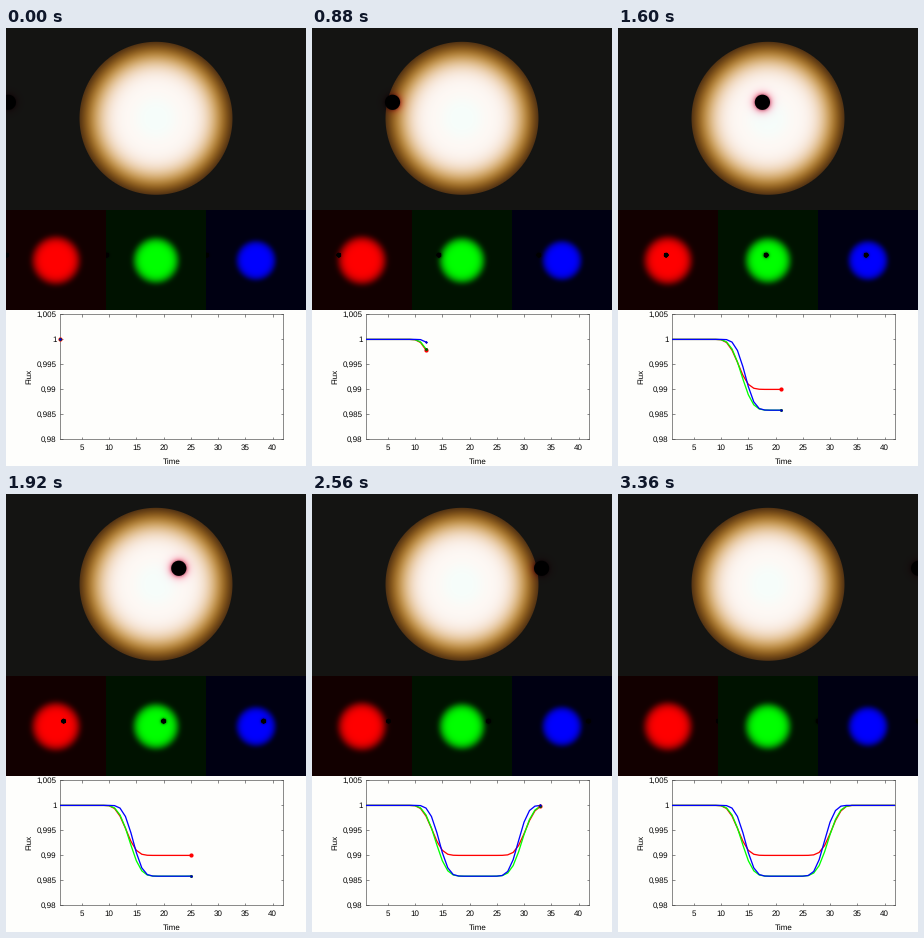
Write a matplotlib script that moves like this. It is 300 px wide and 438 px high and loops after 3440 ms.

```python
import numpy as np
import matplotlib.pyplot as plt
from matplotlib.animation import FuncAnimation

W, H, FRAMES, STEP_MS = 300, 438, 43, 80
SPLIT, PANEL = 182, 100
PAPER = (254, 254, 252)
SKY = np.array([20, 20, 18])

plt.rcParams.update({"font.family": "Liberation Sans", "font.size": 7.8,
                     "text.hinting": "none", "text.hinting_factor": 1})
fig = plt.figure(figsize=(W / 72, H / 72), dpi=72)


def distance(cx, cy, w, h):
    """Distance of every pixel centre from (cx, cy)."""
    y, x = np.mgrid[0:h, 0:w] + 0.5
    return np.hypot(x - cx, y - cy)


def falloff(r, size, power):
    """Flat-topped glow: 1 in the middle, soft towards the limb."""
    return np.exp(-(r / size) ** power)


def rgb(r, shape, params):
    return np.stack([shape(r, *p) for p in params], axis=-1)


# Large star: each colour fades at its own radius
r = distance(150, 90.3, W, SPLIT)[..., None]
glow = rgb(r[..., 0], falloff, [(73.5, 7.2), (68, 6), (60, 7)])
core = falloff(r, 20, 4) * [-7, 4, 5]
edge = np.clip(77 - r, 0, 1)
main = SKY + edge * glow * (np.array([253, 249, 245]) - SKY + core)

# Filtered views, one lit channel each
r = distance(50, 50.4, PANEL, PANEL)
views = [18 + 237 * falloff(r, *p) for p in [(23.3, 6.6), (22, 6.5), (19.3, 7)]]


def transmission(r, depth, height):
    """Opaque planet wrapped in a thin, tinted atmosphere."""
    haze = 1 - depth * np.exp(-np.maximum(r - 7.6, 0) / height)
    return np.clip(r - 7.1, 0, 1) * haze


AIR = [(0.2, 1.2), (0.55, 2.8), (0.45, 2.6)]


def sky(i):
    px, py = 2.4 + 7.1 * i, 74.3
    img = np.full((H, W, 3), PAPER, float)
    img[:SPLIT] = main * rgb(distance(px, py, W, SPLIT), transmission, AIR)
    row = img[SPLIT:SPLIT + PANEL]
    row[:] = 0
    r = 3 * distance(px / 3, 45.1, PANEL, PANEL)
    for c, view in enumerate(views):
        row[:, PANEL * c:PANEL * (c + 1), c] = view * transmission(r, *AIR[c])
    return img.round().astype(np.uint8)


# Transit light curves, mirrored about mid-transit
MID = 21.7
time = np.arange(1, FRAMES + 1)
phase = MID - np.abs(time - MID)


def transit(depth, start, size, power):
    return 1 - depth * (1 - falloff(np.maximum(phase - start, 0), size, power))


flux = [transit(0.01, 9, 4.65, 3.25),
        transit(0.01416, 9, 5.3, 3.4),
        transit(0.01416, 10, 4.87, 3.65)]

stage = fig.add_axes([0, 0, 1, 1])
stage.axis("off")
picture = stage.imshow(sky(0), extent=(0, W, H, 0), aspect="auto",
                       interpolation="nearest")

left, right, top, bottom = 54.1, 277.4, 286.4, 411.4
ax = fig.add_axes([left / W, 1 - bottom / H, (right - left) / W,
                   (bottom - top) / H], facecolor="none")
ax.set(xlim=(1, 42), ylim=(0.98, 1.005))
ax.set_xticks(range(5, 41, 5))
ticks = np.linspace(0.98, 1.005, 6)
ax.set_yticks(ticks, [f"{t:.4g}".replace(".", ",") for t in ticks])
ax.tick_params(direction="in", top=True, right=True, length=2.5,
               width=0.6, color="#404040", pad=3.5)
ax.tick_params(axis="x", pad=5)
for spine in ax.spines.values():
    spine.set(linewidth=0.6, color="#404040")
fig.text(166 / W, 1 - 433.5 / H, "Time", ha="center", va="center")
fig.text(22.8 / W, 1 - 348.5 / H, "Flux", ha="center", va="center", rotation=90)

lines = [ax.plot([], [], color=c, lw=1.3, zorder=3)[0]
         for c in ("#ff0000", "#00ff00", "#0000ff")]
DOTS = [("o", 4.2, "#ff0000"), ("o", 3, "#006400"), ("D", 2.2, "#0000c8")]
dots = [ax.plot([], [], m, ms=s, color=c, mew=0, zorder=5, clip_on=False)[0]
        for m, s, c in DOTS]


def draw(i):
    picture.set_data(sky(i))
    for line, dot, f in zip(lines, dots, flux):
        line.set_data(time[:i + 1], f[:i + 1])
        dot.set_data(time[i:i + 1], f[i:i + 1])
        dot.set_visible(time[i] <= 42)
    return [picture, *lines, *dots]


anim = FuncAnimation(fig, draw, frames=FRAMES, interval=STEP_MS,
                     repeat=True, repeat_delay=0, blit=False)
plt.show()
```
